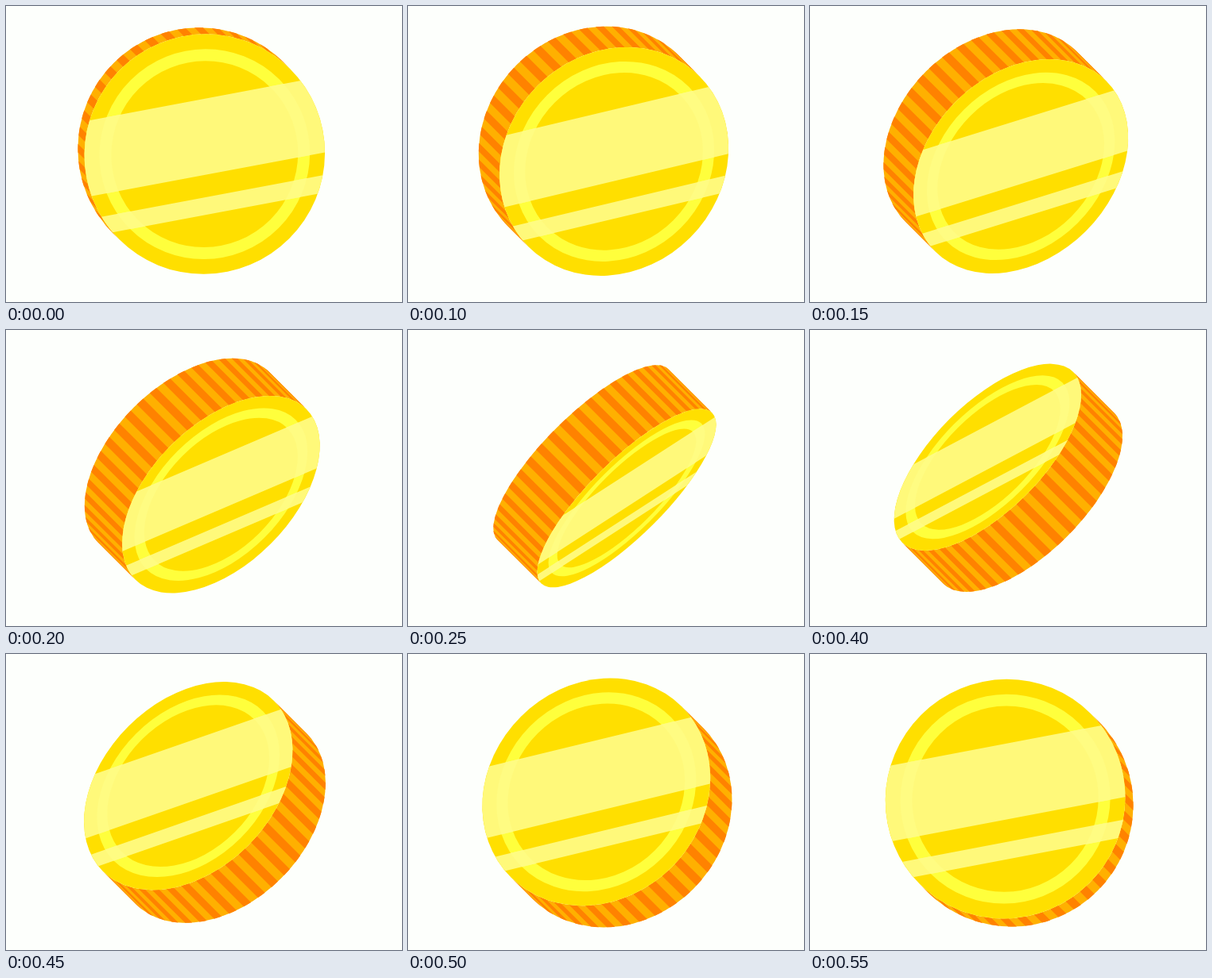
Recreate the animation shown at these times as an HTML page with a canvas. Size 498 by 373 pixels, loop 600 ms.

```html
<!DOCTYPE html>
<html lang="en">
<head>
<meta charset="utf-8">
<title>Spinning coin</title>
<style>
  html, body { margin: 0; width: 100%; height: 100%; overflow: hidden; background: #fdfffc; }
  canvas { display: block; }
</style>
</head>
<body>
<canvas id="stage" width="498" height="373"></canvas>
<script>
const ctx = document.getElementById('stage').getContext('2d');
const R = 152, THICK = 82, RIDGES = 22, STEP = 50;
const RAD = Math.PI / 180, TILT = Math.PI / 4;
// Turn of the coin in degrees for each step of the loop
const turns = [8.1, 17, 26.9, 40.5, 54.5, 72, 85.5, 98.9, 116.5, 134.4, 152, 170];

function disc(r, color) {
  ctx.beginPath();
  ctx.arc(0, 0, r, 0, 2 * Math.PI);
  ctx.fillStyle = color;
  ctx.fill();
}

function ring(color) {
  ctx.beginPath();
  ctx.arc(0, 0, 125.5, 0, 2 * Math.PI);
  ctx.lineWidth = 15;
  ctx.strokeStyle = color;
  ctx.stroke();
}

// Part of the rim between two angles, from the far disc to the near one
function rim(x, b, from, to, color) {
  ctx.beginPath();
  ctx.ellipse(-x, 0, b, R, 0, from, to);
  ctx.ellipse(x, 0, b, R, 0, to, from, true);
  ctx.closePath();
  ctx.fillStyle = color;
  ctx.fill();
}

function drawFace(squash) {
  ctx.scale(squash, 1);
  ctx.rotate(-TILT);
  disc(R, '#ffdf00');
  ring('#ffff3c');
  ctx.rotate(-10.4 * RAD);
  ctx.beginPath();
  ctx.arc(0, 0, R, 0, 2 * Math.PI);
  ctx.clip();
  ctx.beginPath();
  ctx.rect(-R, -69, 2 * R, 95);
  ctx.rect(-R, 54, 2 * R, 22);
  ctx.fillStyle = '#fff97a';
  ctx.fill();
  ctx.clip();
  ring('#fffc82');
}

function draw(degrees) {
  const c = Math.cos(degrees * RAD), s = Math.sin(degrees * RAD);
  const side = Math.sign(c), b = R * Math.abs(c), x = side * s * THICK / 2;
  const start = side * Math.PI / 2, pitch = Math.PI / RIDGES;

  ctx.fillStyle = '#fdfffc';
  ctx.fillRect(0, 0, 498, 373);
  ctx.save();
  ctx.translate(248.2 - 2.5 * c, 185.1 - 2.6 * c);
  ctx.rotate(TILT);

  rim(x, b, start, start + Math.PI, '#ffb000');
  for (let i = 0; i < RIDGES; i++) {
    const a = start + (i + 0.25) * pitch;
    rim(x, b, a, a + pitch / 2, '#ff8200');
  }
  ctx.translate(x, 0);
  drawFace(b / R);
  ctx.restore();
}

function tick() {
  draw(turns[Math.floor(performance.now() / STEP) % turns.length]);
  requestAnimationFrame(tick);
}
tick();
</script>
</body>
</html>
```
